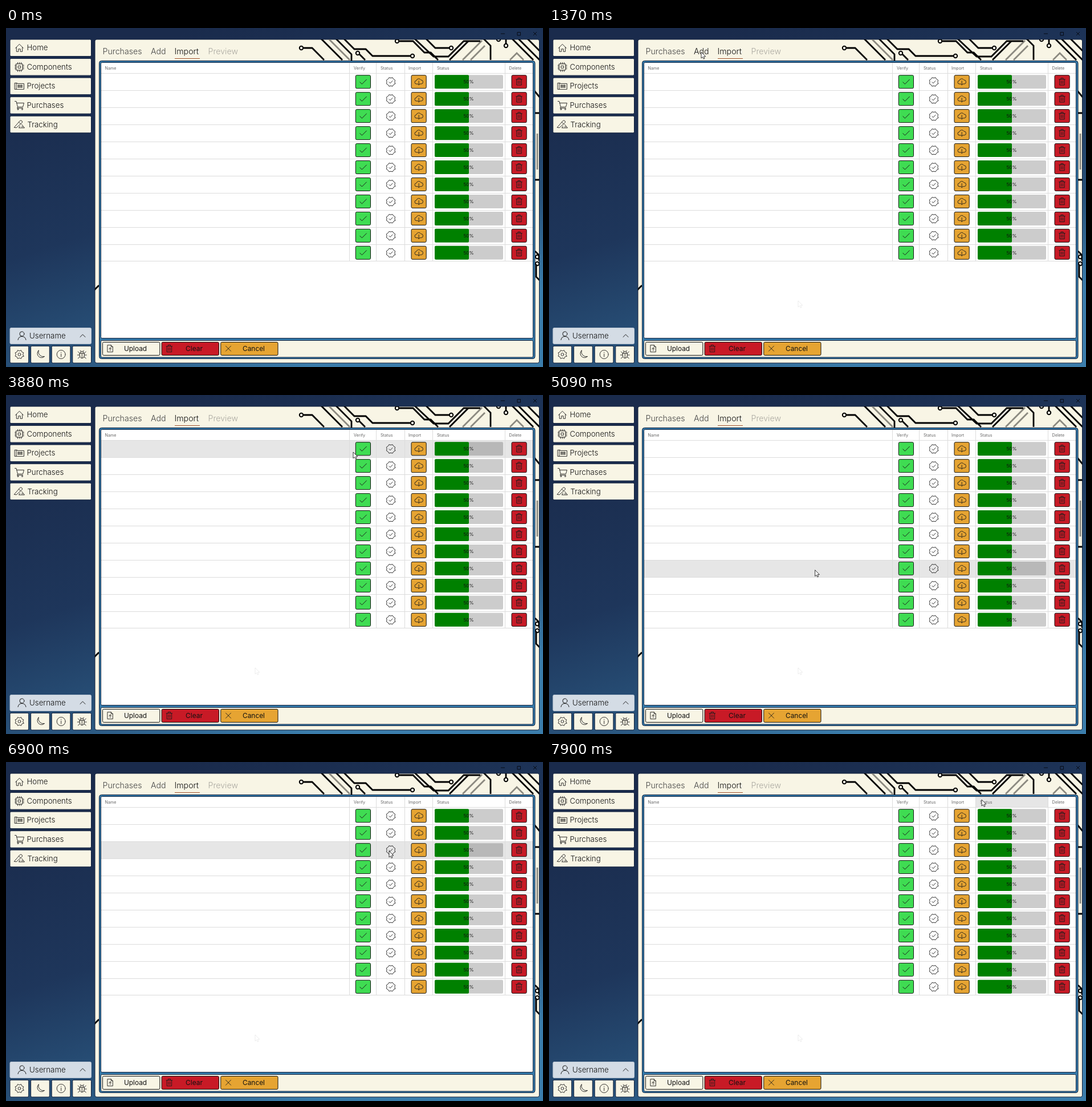
An HTML page for the animation above (8 s loop, 942 by 594 pixels).

```html
<!DOCTYPE html>
<html>
<head>
<meta charset="utf-8">
<style>
html, body { margin: 0; width: 100%; height: 100%; overflow: hidden; }
svg { display: block; font-family: Inter, sans-serif; }
.icon { fill: none; stroke: #1c1c1c; stroke-linecap: round; stroke-linejoin: round; }
.nav { font-size: 13.3px; font-weight: 300; fill: #111; }
.tab { font-size: 14.2px; font-weight: 300; fill: #444; }
.head { font-size: 7.2px; fill: #666; }
.action { font-size: 11.9px; fill: #111; }
.percent { font-size: 8.2px; fill: #111; }
.trace { fill: none; stroke: #000; stroke-width: 2.8; }
.faint { stroke: #8b8980; }
</style>
</head>
<body>
<svg id="stage" width="942" height="594" viewBox="0 0 942 594"></svg>
<script>
const CREAM = '#f8f5e5', INK = '#12213c', GREEN = '#3fdc52', ORANGE = '#e6a432', RED = '#c81a26';
const COLUMNS = [167, 602.5, 649.5, 699.5, 748.5, 875.5, 924];
const ROW_TOP = 79.5, ROW_HEIGHT = 29.95, ROWS = 11;

// Outline with eight soft bumps, used for the badge and the gear
function scallop(radius, dip) {
  let path = '';
  for (let i = 0; i <= 16; i++) {
    const r = i % 2 ? radius - dip : radius, a = i * Math.PI / 8 + Math.PI / 8;
    path += `${i ? 'L' : 'M'}${(r * Math.cos(a)).toFixed(2)} ${(r * Math.sin(a)).toFixed(2)}`;
  }
  return path + 'Z';
}

const ICONS = {
  home: 'M-7 .5L0-6.5 7 .5M-5.2-1V6.5H-1.7V2H1.7V6.5H5.2V-1',
  chip: 'M-5.5-5.5H5.5V5.5H-5.5ZM-2-2H2V2H-2ZM-3-5.5V-8M0-5.5V-8M3-5.5V-8M-3 5.5V8M0 5.5V8M3 5.5V8M-5.5-3H-8M-5.5 0H-8M-5.5 3H-8M5.5-3H8M5.5 0H8M5.5 3H8',
  board: 'M-8-5.5H-4V-4.5H8V5.5H-8ZM-5.5-5V5M-2 2.5V-2.5M1 2.5V-2.5M4 2.5V-2.5M-3-1H5.5M-3 1.5H5.5',
  cart: 'M-8-7H-5.5L-3 3H6L8-4H-4.7M-3 3L-4 5H6M-1.5 7A1 1 0 1 1-3.5 7 1 1 0 1 1-1.5 7M6 7A1 1 0 1 1 4 7 1 1 0 1 1 6 7',
  ruler: 'M-9 5L1-6.5Q3-8 4.5-6T4-2.5L-5 5.5ZM-1-4L2-1M4 0L9 6H-1L1 3M4 4H6',
  user: 'M4-3A4 4 0 1 1-4-3 4 4 0 1 1 4-3M-7 7.5Q-6 1.5 0 1.5T7 7.5',
  chevron: 'M-4.5 2L0-2.5 4.5 2',
  gear: scallop(8, 1.9) + 'M2.5 0A2.5 2.5 0 1 1-2.5 0 2.5 2.5 0 1 1 2.5 0',
  moon: 'M-3-7A7.4 7.4 0 1 0 7.5 3.5 8.5 8.5 0 0 1-3-7Z',
  info: 'M7.5 0A7.5 7.5 0 1 1-7.5 0 7.5 7.5 0 1 1 7.5 0M0-1V4M0-3.8V-3.3',
  bug: 'M-4-2H4V2.5A4 4 0 0 1-4 2.5ZM-3-2A3 3.5 0 0 1 3-2M0-2V6.5M-8 1H-4M4 1H8M-7-5L-4-2M7-5L4-2M-7 7L-3.5 4M7 7L3.5 4M-3-7L-1.7-5M3-7L1.7-5',
  check: 'M-5.5 .5L-2 4 6-4',
  badge: scallop(8.2, 1.3) + 'M-3 .3L-1 2.3 3-2',
  cloud: 'M-2.5 3.8H-4A3 3 0 0 1-4.3-2.2 4.3 4.3 0 0 1 3.6-3.2 3.5 3.5 0 0 1 4 3.8H2.5M0-1.5V5.5M-2 3.5L0 5.5 2 3.5',
  trash: 'M-5.3-4H5.3M-2-4V-6.2H2V-4M-4.2-4V6H4.2V-4M-1.4-1.3V3.5M1.4-1.3V3.5',
  file: 'M-4.5-6H1.5L4.5-3V6H-4.5ZM1.5-6V-3H4.5M0 3.5V-1.5M-2 .5L0-1.5 2 .5',
  cross: 'M-4.5-4.5L4.5 4.5M4.5-4.5L-4.5 4.5'
};

const icon = (name, x, y, width = 1) =>
  `<path class="icon" d="${ICONS[name]}" stroke-width="${width}" transform="translate(${x} ${y})"/>`;
const box = (x, y, w, h, fill, stroke = INK, r = 2, more = '') =>
  `<rect x="${x}" y="${y}" width="${w}" height="${h}" rx="${r}" fill="${fill}" stroke="${stroke}" ${more}/>`;
const text = (kind, x, y, label, more = '') => `<text class="${kind}" x="${x}" y="${y}" ${more}>${label}</text>`;
const trace = (d, kind = '') => `<path class="trace ${kind}" d="${d}"/>`;
const ring = (x, y) => `<circle class="trace" cx="${x}" cy="${y}" r="3.2" style="stroke-width:2"/>`;
const arrow = 'M0 0V11L2.5 8.7 4.2 12.3 6 11.5 4.4 8H7.8Z';

function circuit() {
  const dark = [
    'M522 35H537L558 56', 'M553 19L590 56', 'M579 19L606 46V57', 'M620 46L630 56',
    'M593 19L611 37H631L643 49H709', 'M690 23H714L734 43H745L758 56', 'M737 19L753 35H777',
    'M717 19L750 50H776L803 23H832', 'M778 56L811 23', 'M838 19L850 31V56', 'M877 19V27',
    'M888 19L925 56', 'M899 19L936 56', 'M915 19L936 40',
    'M926 109L936 121', 'M928 149H936', 'M928 266H936', 'M928 391L935 398V408',
    'M930 414V436L936 442', 'M155 459L163 451'
  ];
  const faint = ['M566 19L603 56', 'M801 56L835 22', 'M815 56L840 31', 'M884 56L896 44L908 56', 'M932 185V248'];
  return faint.map(d => trace(d, 'faint')).join('') + dark.map(d => trace(d)).join('') +
    [[518, 35], [617, 44], [713, 49], [686, 23], [781, 35], [877, 31], [864, 20], [932, 401], [932, 413]].map(p => ring(...p)).join('');
}

function sidebar() {
  const items = [['Home', 'home', 36.5], ['Components', 'chip', 36.5], ['Projects', 'board', 36.5],
    ['Purchases', 'cart', 36.5], ['Tracking', 'ruler', 37.5]];
  let out = items.map(([label, name, x], i) => {
    const y = 34.8 + i * 33.55;
    return box(7, y - 14.8, 142.5, 29.6, CREAM) + icon(name, 23.5, y, .9) + text('nav', x, y + 4.5, label);
  }).join('');
  out += box(7, 525.5, 142.5, 28, '#d4dce5', '#b9c5d2') + icon('user', 28, 539) +
    text('nav', 41, 543.7, 'Username') + icon('chevron', 134.5, 539.5);
  ['gear', 'moon', 'info', 'bug'].forEach((name, i) => {
    const x = 7 + i * 36.6;
    out += box(x, 557.3, 32.7, 29.7, CREAM) + icon(name, x + 16.5, 572, .9);
  });
  return out;
}

function table() {
  let out = '';
  for (let i = 0; i <= ROWS; i++) out += `<path d="M167 ${Math.floor(ROW_TOP + i * ROW_HEIGHT) + .5}H924" stroke="#dcdcdc"/>`;
  COLUMNS.slice(1, 6).forEach(x => out += `<path d="M${x} 61V408" stroke="#dcdcdc"/>`);
  ['Name', 'Verify', 'Status', 'Import', 'Status', 'Delete'].forEach((label, i) =>
    out += text('head', [173.5, 610, 657, 706, 756, 882.5][i], 72.6, label));
  for (let i = 0; i < ROWS; i++) {
    const y = 94.3 + i * ROW_HEIGHT;
    out += box(613.3, y - 11.5, 26.2, 23, GREEN, '#111') + icon('check', 626.4, y) +
      icon('badge', 675, y + .2, .9) +
      box(711, y - 11.5, 26.2, 23, ORANGE, '#111') + icon('cloud', 724.2, y, .9) +
      box(752, y - 12, 120, 24, '#0003', 'none') + box(752, y - 12, 60, 24, '#008000', 'none') +
      text('percent', 811.5, y + 3, '50%', 'text-anchor="middle"') +
      box(887, y - 11.5, 26.2, 23, RED, '#111') + icon('trash', 900, y - .3);
  }
  return out;
}

function actions() {
  return [['Upload', CREAM, 'file', 227], ['Clear', RED, 'trash', 330], ['Cancel', ORANGE, 'cross', 434.5]]
    .map(([label, fill, name, x], i) => {
      const left = 169.5 + i * 103.6;
      return box(left, 550.5, 100.3, 23, fill, '#111', 2, `id="${label}"`) + icon(name, left + 13.3, 561.7, .9) +
        text('action', x, 565.5, label, 'text-anchor="middle"');
    }).join('');
}

const TABS = [['Purchases', 169.5, 240], ['Add', 254, 281]];

stage.innerHTML = `
<defs>
  <linearGradient id="sky" gradientUnits="userSpaceOnUse" x1="330" y1="0" x2="530" y2="594">
    <stop offset="0" stop-color="#1a2b4c"/><stop offset=".45" stop-color="#1e365b"/>
    <stop offset=".75" stop-color="#285179"/><stop offset="1" stop-color="#3b7dab"/>
  </linearGradient>
  <clipPath id="panel"><rect x="156" y="20" width="779.5" height="567" rx="3"/></clipPath>
</defs>
<rect width="942" height="594" fill="url(#sky)"/>
<path d="M868 10H875M897 7.5H902.5V13H897ZM925 7L931 13M931 7L925 13" fill="none" stroke="#060b14"/>
${sidebar()}
${box(156, 20, 779.5, 567, CREAM, INK, 3)}
<g clip-path="url(#panel)">${circuit()}</g>
${text('tab', 169.5, 45.8, 'Purchases', 'id="tab0"')}${text('tab', 254, 45.8, 'Add', 'id="tab1"')}
${text('tab', 295.5, 45.8, 'Import', 'style="fill:#111"')}${text('tab', 354.5, 45.8, 'Preview', 'style="fill:#aaa8a0"')}
<path d="M296 53.5H340" stroke="#a5562f"/>
${box(163.5, 57.5, 764.5, 522, '#3479a9', INK, 4)}
${box(166.5, 60.5, 758, 483, '#fff', INK)}
${box(166.5, 547.5, 758, 29.5, CREAM, INK)}
<rect id="hover" fill="#e6e6e6"/>
${table()}
${actions()}
<path id="ghost" d="${arrow}" fill="none" stroke="#000" opacity=".07" transform="translate(437 478)"/>
<path id="cursor" d="${arrow}" fill="#fff" stroke="#222" stroke-width=".9"/>`;

// Pointer moves: start, end, number of steps, waypoints spread evenly over the steps
const MOVES = [
  [290, 970, 8, [[470, 550], [437, 478], [412, 335], [386, 205], [361, 107], [340, 70], [326, 52], [322, 46]]],
  [1270, 1370, 2, [[292, 44], [267, 42]]],
  [1580, 2280, 8, [[205, 42], [196, 45], [250, 45], [316, 45]]],
  [2480, 3280, 9, [[330, 47], [342, 51]]],
  [3380, 3680, 4, [[365, 47], [425, 62], [510, 80], [585, 93]]],
  [3880, 4680, 9, [[609, 100], [622, 88], [628, 72], [645, 68], [670, 68], [700, 69], [722, 70], [716, 78], [700, 90]]],
  [4790, 5590, 9, [[520, 250], [360, 420], [270, 543]]],
  [5690, 6490, 9, [[226, 567], [320, 564], [444, 560]]],
  [6590, 7300, 8, [[540, 400], [672, 156], [690, 110], [700, 68]]],
  [7400, 7900, 6, [[790, 180], [800, 306], [780, 160], [759, 66]]]
];

function pointerAt(time) {
  let from = null;
  for (const [start, end, steps, points] of MOVES) {
    if (time < start) break;
    const step = Math.min(steps, Math.floor((time - start + 5) / (end - start) * (steps - 1)) + 1);
    const along = step / steps * points.length, i = Math.min(points.length - 1, Math.floor(along));
    const a = i ? points[i - 1] : from || points[0], b = points[i];
    from = a.map((v, k) => v + (b[k] - v) * (along - i));
  }
  return from;
}

function place(el, x = 0, y = 0, width = 0, height = 0) {
  for (const [key, value] of Object.entries({ x, y, width, height })) el.setAttribute(key, value);
}

const $ = id => document.getElementById(id);

function draw(time) {
  const point = pointerAt(time), [x, y] = point || [-50, -50];
  $('cursor').setAttribute('transform', `translate(${x} ${y})`);
  $('ghost').style.display = time >= 480 ? '' : 'none';

  const row = Math.floor((y - ROW_TOP) / ROW_HEIGHT), column = COLUMNS.findIndex(c => c > x) - 1;
  const inside = x > 167 && x < 924;
  if (inside && row >= 0 && row < ROWS) place($('hover'), 167, Math.floor(ROW_TOP + row * ROW_HEIGHT) + 1, 757, 29);
  else if (inside && y > 61 && y < ROW_TOP) place($('hover'), COLUMNS[column], 61, COLUMNS[column + 1] - COLUMNS[column], 18);
  else place($('hover'));

  $('Upload').setAttribute('fill', y > 550 && y < 574 && x > 169 && x < 270 ? '#dadada' : CREAM);
  TABS.forEach(([, left, right], i) =>
    $('tab' + i).style.fill = y > 30 && y < 56 && x > left && x < right ? '#111' : '');
}

function tick() {
  draw(performance.now() % 8000);
  requestAnimationFrame(tick);
}
tick();
</script>
</body>
</html>
```
